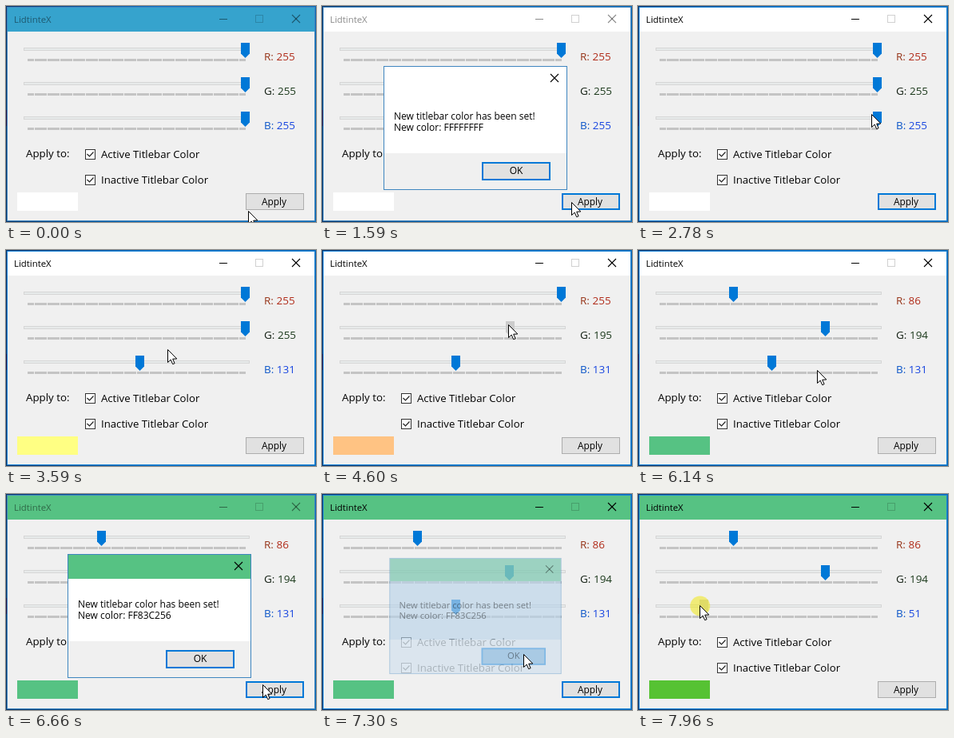
Write an HTML page with a canvas that moves like this. It is 388 by 270 pixels and loops after 7990 ms.

```html
<!DOCTYPE html>
<html lang="en">
<head>
<meta charset="utf-8">
<title>Titlebar color picker</title>
<style>
  html, body { margin: 0; width: 100%; height: 100%; overflow: hidden; }
  canvas { display: block; width: 388px; height: 270px; }
</style>
</head>
<body>
<canvas id="stage" width="388" height="270"></canvas>
<script>
const ctx = document.getElementById('stage').getContext('2d');
const LOOP = 7990;
const LAG = 22; // a thumb trails the pointer by this many ms
const ACCENT = '#0078d7';
const FONT = '"Open Sans", "Noto Sans", sans-serif';

const red = { name: 'R', y: 46, head: '#963418', tone: '#b02a18', drags: [] };
const green = { name: 'G', y: 89, head: '#142014', tone: '#1c3a1c', drags: [] };
const blue = { name: 'B', y: 132, head: '#0a54c8', tone: '#1846e0', drags: [] };
const channels = [red, green, blue];

const dialogs = [
  { click: 1340, ok: 2130, color: '#fff' },
  { click: 6430, ok: 7180, color: 'rgb(86,194,131)' }
];

const clamp = p => Math.max(0, Math.min(1, p));
const smooth = p => p * p * (3 - 2 * p);
const mix = (a, b, p) => a + (b - a) * p;
const thumbX = value => 27.8 + value * 1.0637;

// The pointer rests at each stop and glides between them.
const stops = [];
const drags = [];
const stay = (x, y, from, to) => stops.push({ x, y, from, to });

function drag(channel, from, to, end, y) {
  const last = channel.drags[channel.drags.length - 1];
  stay(thumbX(last ? last.end : 255), y, from - 60, from);
  stay(thumbX(end), y, to, to + 60);
  const move = { from, to, end };
  channel.drags.push(move);
  drags.push(move);
}

stay(304, 257, 0, 20);
stay(321, 234, 250, 570);
stay(313, 246, 690, 1740);
stay(262, 207, 2080, 2200);
stay(293, 136, 2700, 2785);
drag(blue, 2850, 3360, 131, 136);
drag(green, 3978, 4628, 194, 94);
stay(250, 71, 4740, 4770);
drag(red, 5028, 5786, 86, 55);
stay(322, 239, 6420, 6690);
stay(262, 207, 7090, 7240);
drag(blue, 7618, 8018, 42, 140);

function pointerAt(t) {
  const i = stops.findIndex(s => s.from > t);
  const a = stops[i - 1], b = stops[i];
  const p = smooth(clamp((t - a.to) / (b.from - a.to)));
  return [mix(a.x, b.x, p), mix(a.y, b.y, p)];
}

const valueAt = (channel, t) => channel.drags.reduce((value, d) =>
  mix(value, d.end, smooth(clamp((t - d.from - LAG) / (d.to - d.from)))), 255);

const latest = (times, t) => Math.max(-1, ...times.filter(time => time <= t));

function rect(x, y, w, h, color) {
  ctx.fillStyle = color;
  ctx.fillRect(x, y, w, h);
}

function frame(x, y, w, h, border, fill, size = 1) {
  rect(x, y, w, h, border);
  rect(x + size, y + size, w - 2 * size, h - 2 * size, fill);
}

function text(str, x, y, size, color = '#000', align = 'left') {
  ctx.font = `${size}px ${FONT}`;
  ctx.textAlign = align;
  ctx.fillStyle = color;
  ctx.fillText(str, x, y);
}

function path(points, close) {
  ctx.beginPath();
  points.forEach(([x, y]) => ctx.lineTo(x, y));
  if (close) ctx.closePath();
}

function stroke(points, color, width = 1) {
  path(points);
  ctx.strokeStyle = color;
  ctx.lineWidth = width;
  ctx.stroke();
}

function cross(x, y, color) {
  stroke([[x, y], [x + 10, y + 10]], color, 1.1);
  stroke([[x + 10, y], [x, y + 10]], color, 1.1);
}

function drawWindow(color, active) {
  const ink = active ? '#000' : 'rgba(0,0,0,.46)';
  const desktop = ctx.createLinearGradient(0, 0, 388, 0);
  desktop.addColorStop(0, '#083468');
  desktop.addColorStop(0.5, '#0a72c4');
  desktop.addColorStop(1, '#0a68b4');
  rect(0, 0, 388, 270, desktop);
  rect(0, 130, 1, 20, '#2a1040');
  frame(1, 1, 386, 268, active ? '#1883d7' : '#3f86c0', '#f0f0f0');

  rect(2, 2, 384, 30, color);
  text('LidtinteX', 10, 21, 11.4, ink);
  rect(267, 16, 10, 1, ink);
  ctx.strokeStyle = 'rgba(0,0,0,.18)';
  ctx.lineWidth = 1;
  ctx.strokeRect(312.5, 11.5, 9, 9);
  cross(358, 11, ink);
}

function drawSlider(channel, value, t, [px, py]) {
  const { y, name, head, tone } = channel;
  frame(22, y + 6, 283, 4, '#d6d6d6', '#e7eaea');
  for (let i = 0; i < 256; i++) {
    rect(27 + Math.round(i * 272 / 255), y + 20, 1, 3, '#c4c4c4');
  }
  const x = Math.round(thumbX(value) - 5.5);
  const hovered = px >= x && px < x + 11 && py >= y && py < y + 19;
  const pressed = channel.drags.some(d => t >= d.from && t < d.to + LAG);
  const ready = hovered && channel === green;
  path([[x, y], [x + 11, y], [x + 11, y + 13.5], [x + 5.5, y + 19], [x, y + 13.5]], true);
  ctx.fillStyle = pressed ? '#ccc' : ready ? '#171717' : ACCENT;
  ctx.fill();
  text(`${name}: `, 323, y + 22, 13.5, head);
  text(Math.round(value), 323 + ctx.measureText(`${name}: `).width, y + 22, 13.5, tone);
}

function drawCheckbox(y, label) {
  frame(99, y, 13, 13, '#333', '#fff');
  stroke([[101.5, y + 6], [104.5, y + 9], [109.5, y + 3.5]], '#222', 1.2);
  text(label, 119, y + 11, 13.2);
}

function drawApply(t, [px, py], modal) {
  const hovered = !modal && px >= 300 && px < 373 && py >= 234 && py < 255;
  const focused = latest(dialogs.map(d => d.click), t) > latest(drags.map(d => d.from), t);
  frame(300, 234, 73, 21, hovered || focused ? ACCENT : '#adadad',
    hovered ? '#e5f1fb' : '#e1e1e1', focused ? 2 : 1);
  text('Apply', 335.5, 249, 11.9, '#000', 'center');
}

function drawDialog({ click, ok, color }, t, values) {
  const shown = Math.min((t - click - 80) / 150, 1, 1 - (t - ok - 50) / 120);
  if (shown <= 0) return;
  const scale = mix(0.9, 1, smooth(shown));
  const hex = values.slice().reverse()
    .map(v => Math.round(v).toString(16).padStart(2, '0')).join('').toUpperCase();
  ctx.save();
  ctx.globalAlpha = shown;
  ctx.translate(192, 152.5);
  ctx.scale(scale, scale);
  ctx.translate(-192, -152.5);
  frame(77, 75, 230, 155, '#3f86c0', '#fff');
  rect(78, 76, 228, 30, color);
  rect(78, 184, 228, 45, '#f0f0f0');
  cross(286, 85, '#000');
  text('New titlebar color has been set!', 90, 142, 12);
  text(`New color: FF${hex}`, 90, 156, 12);
  frame(200, 195, 86, 23, ACCENT, '#e1e1e1', 2);
  text('OK', 243, 210, 12, '#000', 'center');
  ctx.restore();
}

function drawPointer([x, y], t) {
  const clicking = dialogs.some(d => [d.click, d.ok].some(c => t >= c && t < c + 90));
  const dragging = drags.some(d => t >= d.from && t < mix(d.from, d.to, 0.9));
  if (clicking || dragging) {
    ctx.fillStyle = 'rgba(240,232,20,.55)';
    ctx.beginPath();
    ctx.arc(x, y, 12.5, 0, 2 * Math.PI);
    ctx.fill();
  }
  ctx.save();
  ctx.translate(Math.round(x) - 0.5, Math.round(y) - 0.5);
  path([[0, 0], [0, 16], [3.7, 12.6], [6.2, 18.2], [8.6, 17.2], [6.2, 11.7], [11.3, 11.5]], true);
  ctx.fillStyle = '#fff';
  ctx.fill();
  ctx.strokeStyle = '#000';
  ctx.lineWidth = 1;
  ctx.stroke();
  ctx.restore();
}

function draw(t) {
  const pointer = pointerAt(t);
  const values = channels.map(c => valueAt(c, t));
  const modal = dialogs.some(d => t >= d.click + 80 && t < d.ok + 50);
  const barColor = dialogs.reduce((c, d) => t >= d.click + 50 ? d.color : c, '#36a3cd');

  drawWindow(barColor, t >= dialogs[0].click && !modal);
  channels.forEach((c, i) => drawSlider(c, values[i], t, pointer));
  text('Apply to:', 25, 189, 13.3);
  drawCheckbox(179, 'Active Titlebar Color');
  drawCheckbox(211, 'Inactive Titlebar Color');
  rect(14, 233, 76, 23, `rgb(${values.map(Math.round)})`);
  drawApply(t, pointer, modal);
  dialogs.forEach(d => drawDialog(d, t, values));
  drawPointer(pointer, t);
}

const start = performance.now();
function tick() {
  draw((performance.now() - start) % LOOP);
  requestAnimationFrame(tick);
}
tick();
</script>
</body>
</html>
```
